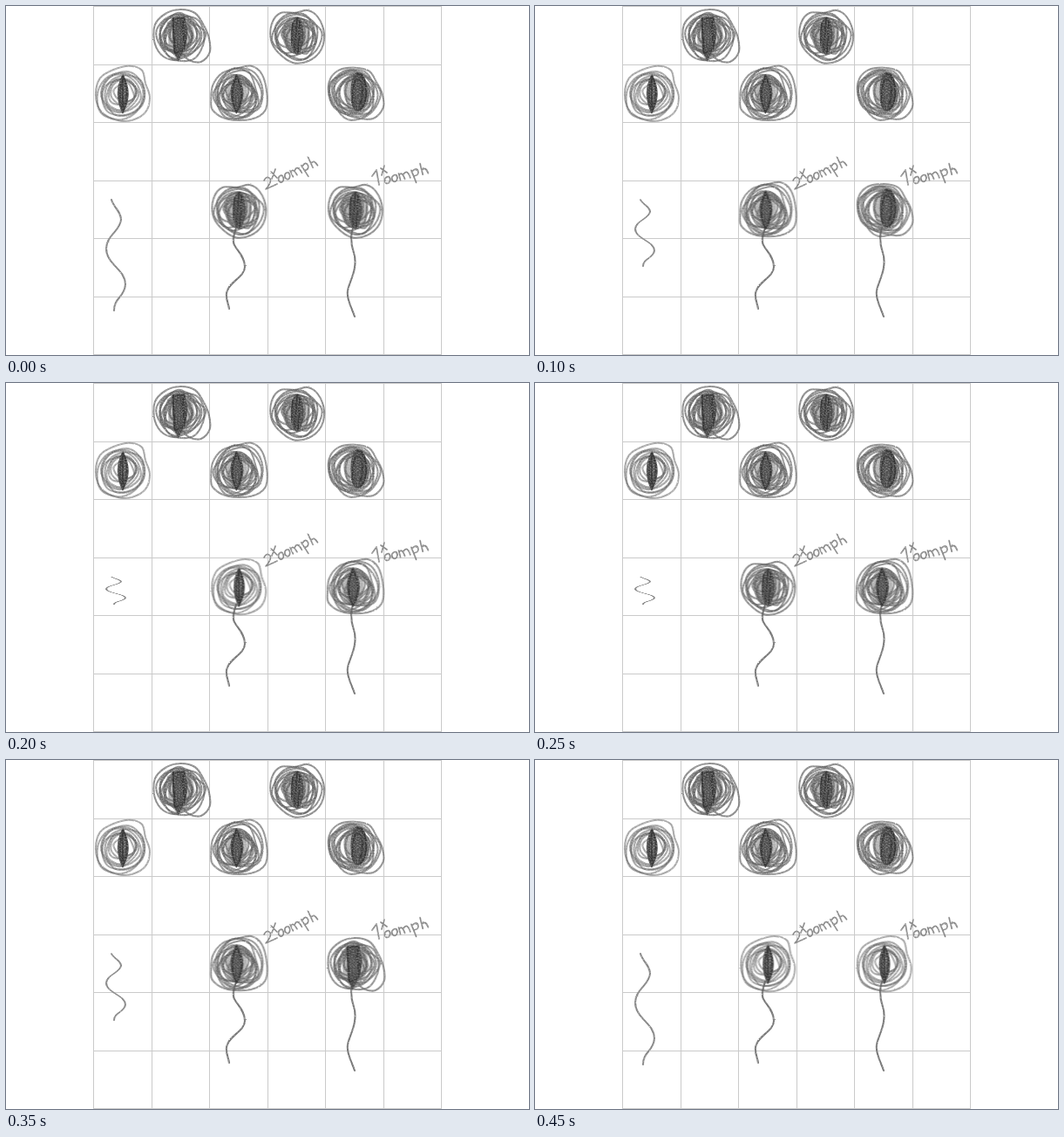
Animation, 600 px wide and 400 px high, one loop 0.5 s. Source, as an HTML page:

```html
<!DOCTYPE html>
<html lang="en">
<head>
<meta charset="utf-8">
<title>Scribble heads</title>
<style>
  html, body { margin: 0; width: 100%; height: 100%; overflow: hidden; background: #fff; }
  #stage { display: block; width: 600px; height: 400px; }
  path { fill: none; stroke-linecap: round; stroke-linejoin: round; }
  .grid { stroke: #cacaca; shape-rendering: crispEdges; }
  .line { stroke: #777; stroke-width: 2.1; }
  .note { stroke: #8a8a8a; stroke-width: 1.7; }
  .wash { fill: #686868; }
  .core { fill: #464646; fill-opacity: .9; stroke: #4a4a4a; stroke-width: 1.4; }
  .marks { stroke: #2e2e2e; stroke-opacity: .8; stroke-width: 1.8; }
  .strip { animation: swap .5s steps(5) infinite; }
  .fast { animation-duration: .25s; }
  .wave { stroke: #868686; stroke-width: 2.1; transform-origin: 126px 222px; animation: squash .5s step-end infinite; }
  @keyframes swap { to { transform: translateX(-400px); } }
  @keyframes squash {
    0%, 90%, 100% { transform: scale(1, 1); }
    10%, 80% { transform: scale(-1, .82); }
    20%, 70% { transform: scale(1, .6); }
    30%, 60% { transform: scale(-1, .4); }
    40%, 50% { transform: scale(1, .25); }
  }
</style>
</head>
<body>
<svg id="stage" viewBox="0 0 600 400">
  <defs>
    <filter id="pencil" x="-10%" y="-10%" width="120%" height="120%" color-interpolation-filters="sRGB">
      <feTurbulence type="fractalNoise" baseFrequency=".6" numOctaves="2" seed="4"/>
      <feColorMatrix values="1 0 0 0 0  0 1 0 0 0  0 0 1 0 0  0 0 0 0 1" result="noise"/>
      <feDisplacementMap in="SourceGraphic" in2="noise" scale="1.6" xChannelSelector="R" yChannelSelector="G" result="rough"/>
      <feColorMatrix in="noise" values="0 0 0 0 0  0 0 0 0 0  0 0 0 0 0  0 0 .9 0 .5" result="grain"/>
      <feComposite in="rough" in2="grain" operator="in"/>
    </filter>
    <path id="oomph" d="M6-7C2-9-1-4 1-1S8-2 6-7M14-7C10-9 7-4 9-1S16-2 14-7M17 0V-8M17-6Q21-10 22 0M22-6Q27-11 28 0M31-8L33 7M31-6Q38-11 38-4Q37 0 32-1M42-13V0M42-5Q47-9 48 0"/>
  </defs>

  <path class="grid" d="M100.5 0V400M167.5 0V400M233.5 0V400M300.5 0V400M366.5 0V400M433.5 0V400M499.5 0V400M100 .5H500M100 67.5H500M100 133.5H500M100 200.5H500M100 266.5H500M100 333.5H500M100 399.5H500"/>

  <g id="still"></g>

  <path class="line" filter="url(#pencil)" d="M264 254C262 261 259 268 262 274S274 287 274 299S255 316 253 329C252 336 255 340 256 347"/>
  <path class="line" filter="url(#pencil)" d="M398 254C395 263 396 274 399 283S401 300 397 311S390 327 393 337S398 350 400 356"/>

  <svg x="227.3" y="194" width="80" height="80"><g class="strip fast"></g></svg>
  <svg x="360.7" y="194" width="80" height="80"><g class="strip"></g></svg>

  <g class="note" filter="url(#pencil)">
    <path d="M296 200Q299 194 303 198Q305 202 298 210L311 204M304 190L311 197M309 187L305 198"/>
    <use href="#oomph" transform="translate(314 203) rotate(-25)"/>
    <path d="M420 195L425 188L428 205M430 186L437 191M434 183L431 194"/>
    <use href="#oomph" transform="translate(435 204) rotate(-14) scale(1.06 1)"/>
  </g>

  <g class="wave">
    <path filter="url(#pencil)" d="M121 222C124 232 132 235 132 245C131 258 115 263 115 278C115 296 137 302 137 319C136 334 124 334 124 349"/>
  </g>
</svg>

<script>
  const NS = 'http://www.w3.org/2000/svg';
  const stage = document.getElementById('stage');

  function add(parent, tag, attrs) {
    const node = document.createElementNS(NS, tag);
    for (const key in attrs) node.setAttribute(key, attrs[key]);
    return parent.appendChild(node);
  }

  function random(seed) {
    return () => {
      seed = (seed + 0x6D2B79F5) | 0;
      let t = Math.imul(seed ^ (seed >>> 15), 1 | seed);
      t = (t + Math.imul(t ^ (t >>> 7), 61 | t)) ^ t;
      return ((t ^ (t >>> 14)) >>> 0) / 4294967296;
    };
  }

  // Closed Catmull-Rom curve through the points
  function curve(pts) {
    const n = pts.length, at = i => pts[(i + n) % n];
    let d = 'M' + pts[0];
    for (let i = 0; i < n; i++) {
      const [a, b, c, e] = [at(i - 1), at(i), at(i + 1), at(i + 2)];
      const p = [0, 1].map(k => (b[k] + (c[k] - a[k]) / 6).toFixed(1));
      const q = [0, 1].map(k => (c[k] - (e[k] - b[k]) / 6).toFixed(1));
      d += `C${p} ${q} ${c}`;
    }
    return d;
  }

  function loop(rnd, radius, wobble) {
    const turn = rnd() * 6.28, cx = 33 + (rnd() - .5) * wobble, cy = 34 + (rnd() - .5) * wobble;
    return curve(Array.from({ length: 7 }, (_, i) => {
      const a = turn + i * Math.PI * 2 / 7, r = radius + (rnd() - .5) * wobble;
      return [+(cx + r * Math.cos(a)).toFixed(1), +(cy + r * Math.sin(a)).toFixed(1)];
    }));
  }

  const pairs = s => s.split(' ').map(p => p.split(',').map(Number));

  // rim: outer loop; wash: dense shading; core: pupil shape; marks: strokes inside the pupil
  const heads = {
    a: { seed: 11, turns: 11, from: 12, to: 26, wobble: 8, ink: .72, x: 166.7, y: 0,
         rim: '30,62 14,58 4,43 4,22 16,9 33,4 50,8 59,20 66,36 67,53 57,64 43,62 34,54',
         wash: 'M18 18L46 14L50 36L44 50L31 64L20 48Z',
         core: 'M24 14L38 13L41 28L39 46L31 62L26 52Z',
         marks: 'M25 15L27 53M25 15L38 14L35 26L40 37L37 50L28 54M36 18L38 47' },
    b: { seed: 23, turns: 11, from: 11, to: 25, wobble: 8, ink: .72, x: 300, y: 0,
         rim: '12,53 4,39 5,20 15,8 32,8 46,5 58,13 65,32 61,51 47,63 29,65',
         wash: 'M34 12C54 14 54 52 34 56C12 52 12 16 34 12Z',
         core: 'M34 13C43 17 43 50 34 55C25 50 25 18 34 13Z',
         marks: 'M29 20L28 45M34 14L31 52M37 17L35 53' },
    c: { seed: 37, turns: 9, from: 11, to: 28, wobble: 5, ink: .56, x: 100, y: 66.7,
         rim: '3,36 8,16 24,6 42,2 56,7 60,22 65,38 60,55 45,64 27,64 9,54',
         wash: '',
         core: 'M34 12Q46 34 34 56Q23 34 34 12Z',
         marks: 'M34 14Q28 34 34 54M34 14Q43 34 34 54M34 17V50' },
    d: { seed: 41, turns: 12, from: 13, to: 27, wobble: 8, ink: .68, x: 233.3, y: 66.7,
         rim: '2,41 4,24 15,10 31,5 48,2 60,11 66,33 64,53 48,63 21,63 4,53',
         wash: 'M31 12C48 18 48 50 31 56C14 50 14 18 31 12Z',
         core: 'M31 12Q46 34 31 56Q19 34 31 12Z',
         marks: 'M31 14Q22 34 31 54M31 14Q42 34 32 54' },
    e: { seed: 59, turns: 11, from: 14, to: 28, wobble: 8, ink: .68, x: 366.7, y: 66.7,
         rim: '5,40 4,20 15,7 34,4 50,8 58,20 65,34 66,50 55,62 38,62 18,55',
         wash: 'M30 10C20 14 20 48 30 56L44 54L50 30L42 10Z',
         core: 'M37 10C51 10 50 53 36 53C27 53 27 10 37 10Z',
         marks: 'M36 11C49 8 50 52 37 53M32 48C30 32 32 17 37 17S45 32 39 47' }
  };

  const defs = stage.querySelector('defs');
  for (const id in heads) {
    const h = heads[id], rnd = random(h.seed);
    const g = add(defs, 'g', { id, filter: 'url(#pencil)' });
    const pen = { stroke: '#626262', 'stroke-opacity': h.ink, 'stroke-width': 2.1 };
    add(g, 'path', { class: 'wash', d: h.wash, 'fill-opacity': .5 });
    add(g, 'path', { ...pen, d: curve(pairs(h.rim)) });
    for (let i = 0; i < h.turns; i++) {
      const r = h.from + (h.to - h.from) * i / (h.turns - 1);
      add(g, 'path', { ...pen, d: loop(rnd, r, h.wobble) });
    }
    add(g, 'path', { class: 'core', d: h.core });
    add(g, 'path', { class: 'marks', d: h.marks });
    add(document.getElementById('still'), 'use', { href: '#' + id, x: h.x, y: h.y });
  }

  for (const strip of document.querySelectorAll('.strip'))
    [...'bedac'].forEach((id, i) => add(strip, 'use', { href: '#' + id, x: 6 + 80 * i, y: 6 }));
</script>
</body>
</html>
```
